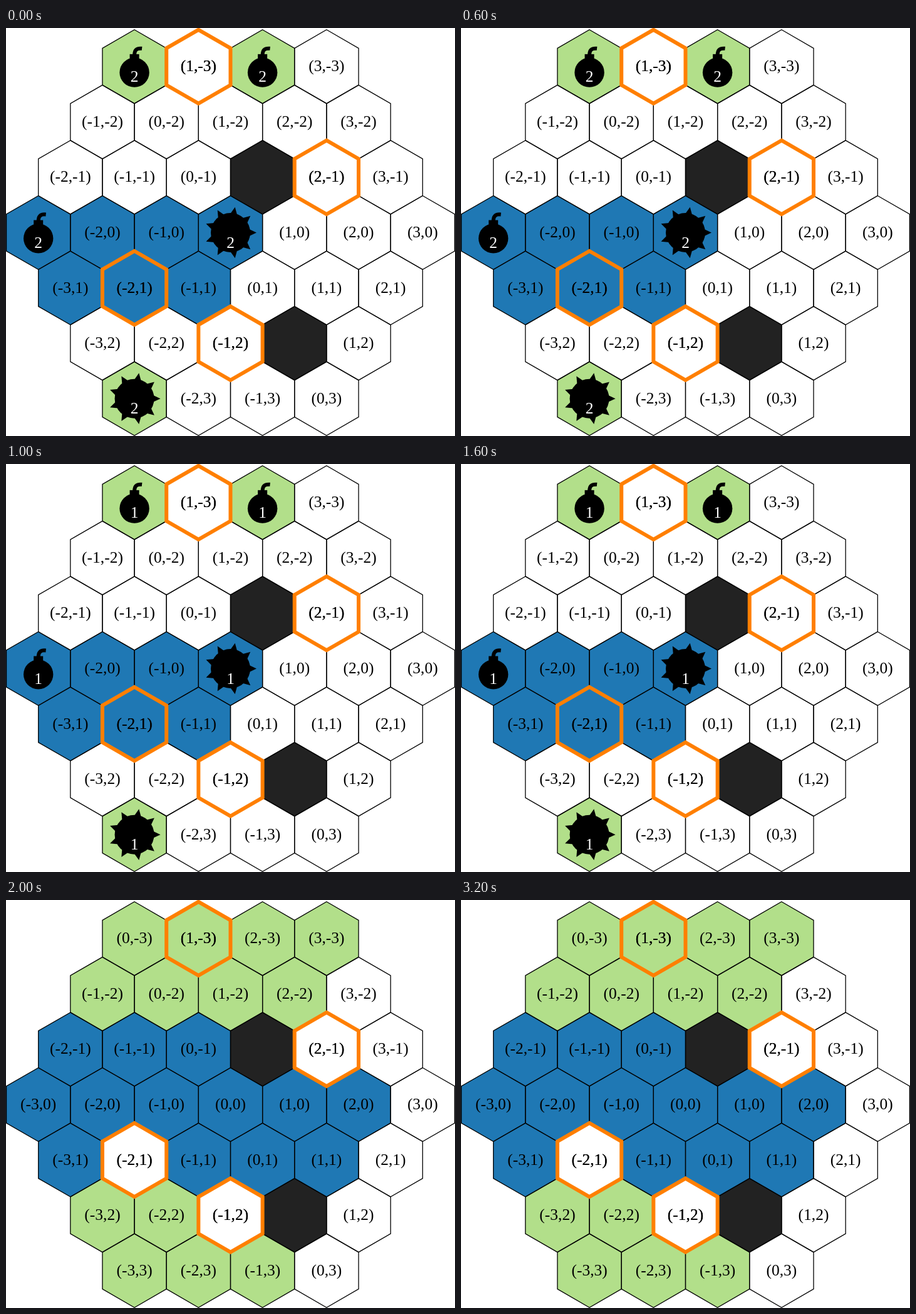
Write an HTML page with a canvas that moves like this. It is 717 by 653 pixels and loops after 4 s.

```html
<!DOCTYPE html>
<html lang="en">
<head>
<meta charset="utf-8">
<title>Hex board</title>
<style>
  html, body { margin: 0; width: 100%; height: 100%; overflow: hidden; background: #fff; }
  canvas { display: block; }
</style>
</head>
<body>
<canvas id="board" width="717" height="653"></canvas>
<script>
const ctx = document.getElementById('board').getContext('2d');
const RADIUS = 59.05;
const STEP_X = 102.27, STEP_Y = 88.55;
const CENTER = { x: 358.5, y: 327.5 };
const LOOP = 4000;
const BLUE = '#1f78b4', GREEN = '#b2df8a', WALL = '#222', ORANGE = '#ff7f00';
const FONT = '25.5px "Liberation Serif", "Times New Roman", serif';

const walls = new Set(['1,-1', '0,2']);
const goals = new Set(['1,-3', '2,-1', '-2,1', '-1,2']);
const devices = {
  '0,-3': drawBomb, '2,-3': drawBomb, '-3,0': drawBomb,
  '0,0': drawMine, '-3,3': drawMine
};

// Each run is [row, first column, last column].
function paintRuns(runs, color, map) {
  for (const [r, from, to] of runs)
    for (let q = from; q <= to; q++) map[`${q},${r}`] = color;
  return map;
}

const before = paintRuns([[0, -3, 0], [1, -3, -1]], BLUE,
  paintRuns([[-3, 0, 0], [-3, 2, 2], [3, -3, -3]], GREEN, {}));
const after = paintRuns([[-1, -2, 0], [0, -3, 2], [1, -3, -3], [1, -1, 1]], BLUE,
  paintRuns([[-3, 0, 3], [-2, -1, 2], [2, -3, -2], [3, -3, -1]], GREEN, {}));

const cells = [];
for (let r = -3; r <= 3; r++)
  for (let q = Math.max(-3, -3 - r); q <= Math.min(3, 3 - r); q++)
    cells.push({
      key: `${q},${r}`,
      x: CENTER.x + STEP_X * (q + r / 2),
      y: CENTER.y + STEP_Y * r
    });

function hexPath({ x, y }) {
  ctx.beginPath();
  for (let i = 0; i < 6; i++) {
    const a = Math.PI * (i / 3 - 0.5);
    ctx.lineTo(x + RADIUS * Math.cos(a), y + RADIUS * Math.sin(a));
  }
  ctx.closePath();
}

function strokeHex(cell, color, width) {
  hexPath(cell);
  ctx.strokeStyle = color;
  ctx.lineWidth = width;
  ctx.stroke();
}

function write(text, x, y, color) {
  ctx.fillStyle = color;
  ctx.fillText(text, x, y);
}

function drawBomb(x, y) {
  ctx.fillStyle = ctx.strokeStyle = '#000';
  ctx.beginPath();
  ctx.arc(x, y + 9.3, 23.7, 0, 2 * Math.PI);
  ctx.fill();
  ctx.fillRect(x - 7.5, y - 20, 15, 10);
  ctx.lineWidth = 6;
  ctx.beginPath();
  ctx.moveTo(x, y - 18);
  ctx.bezierCurveTo(x, y - 26, x + 3, y - 30, x + 12, y - 29);
  ctx.stroke();
}

function drawMine(x, y) {
  ctx.fillStyle = '#000';
  ctx.beginPath();
  ctx.arc(x, y, 31.5, 0, 2 * Math.PI);
  ctx.fill();
  for (let i = 0; i < 9; i++) {
    const a = i * 2 * Math.PI / 9;
    ctx.beginPath();
    for (const [turn, dist] of [[-0.19, 30], [0, 41.5], [0.19, 30]])
      ctx.lineTo(x + dist * Math.cos(a + turn), y + dist * Math.sin(a + turn));
    ctx.fill();
  }
}

function draw(time) {
  const exploded = time >= 2000;
  const count = time < 1000 ? 2 : 1;
  const colors = exploded ? after : before;

  ctx.fillStyle = '#fff';
  ctx.fillRect(0, 0, 717, 653);
  ctx.font = FONT;
  ctx.textAlign = 'center';
  ctx.lineJoin = 'miter';

  for (const cell of cells) {
    const goalCleared = exploded && goals.has(cell.key) && cell.key !== '1,-3';
    hexPath(cell);
    ctx.fillStyle = walls.has(cell.key) ? WALL
      : goalCleared ? '#fff' : colors[cell.key] || '#fff';
    ctx.fill();
  }
  for (const cell of cells) strokeHex(cell, '#000', 1.3);
  for (const cell of cells) if (goals.has(cell.key)) strokeHex(cell, ORANGE, 6);

  for (const { key, x, y } of cells) {
    if (walls.has(key)) continue;
    if (devices[key] && !exploded) {
      devices[key](x, y);
      write(count, x, y + 24, '#fff');
    } else {
      write(`(${key})`, x, y + 7.5, '#000');
      if (goals.has(key)) write(`(${key})`, x, y + 7.5, '#000');
    }
  }
}

const start = performance.now();
function tick() {
  draw((performance.now() - start) % LOOP);
  requestAnimationFrame(tick);
}
tick();
</script>
</body>
</html>
```
